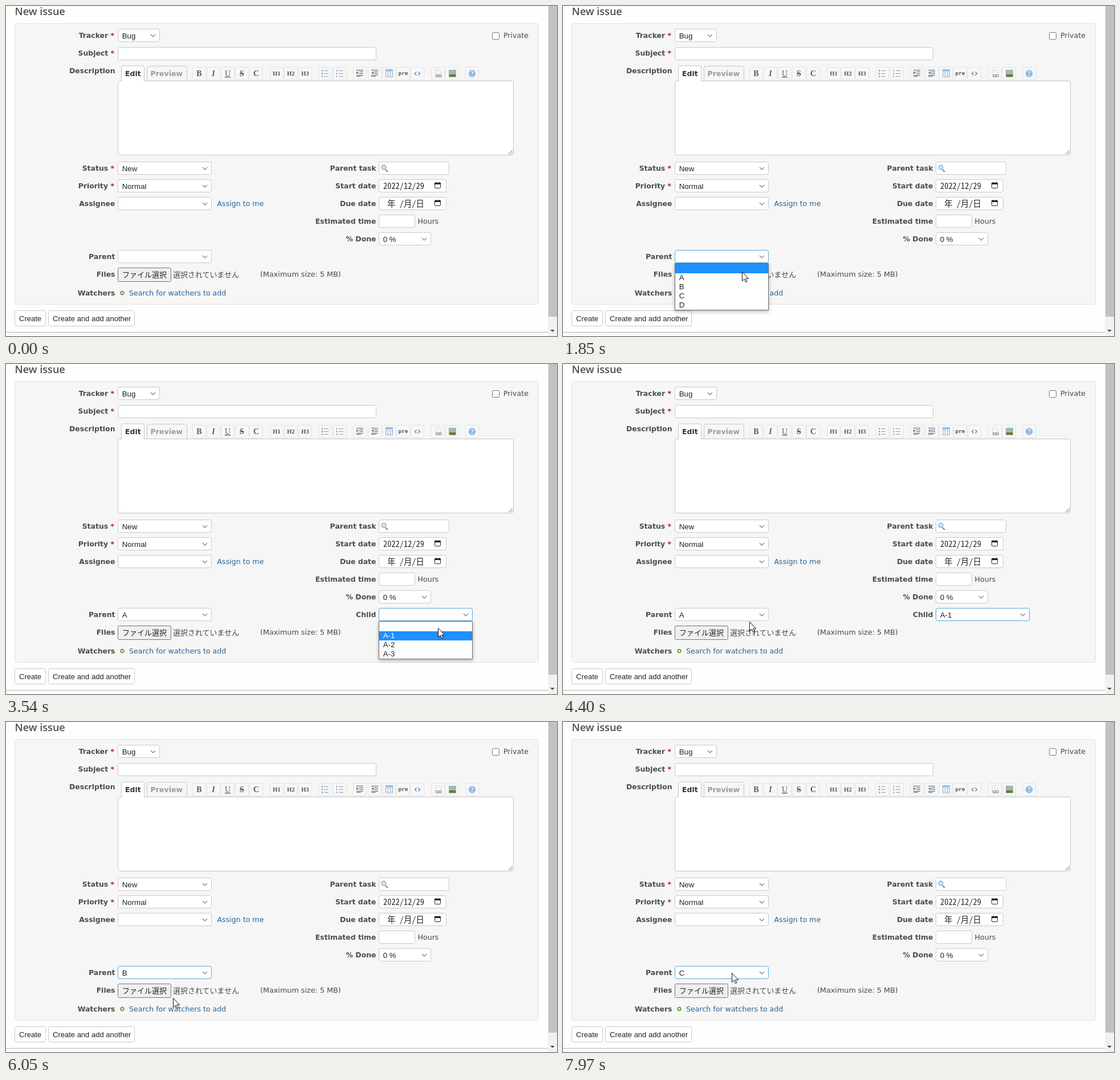
An HTML page for the animation above (8 s loop, 967x579 px).

```html
<!DOCTYPE html>
<html lang="en">
<head>
<meta charset="utf-8">
<title>New issue</title>
<style>
html, body { margin: 0; width: 100%; height: 100%; overflow: hidden; background: #fefefe; }
svg { display: block; width: 967px; height: 579px; }
text { white-space: pre; }
.b { font: bold 12.45px "DejaVu Sans", sans-serif; fill: #4c4c4c; }
.r { font: 12.6px "DejaVu Sans", sans-serif; fill: #484848; }
.link { fill: #2a6496; }
.ui { font: 13px "Liberation Sans", sans-serif; fill: #222; }
.value { font-size: 13.3px; }
.jp { font: 13px "Noto Sans CJK JP", "Noto Sans CJK", sans-serif; fill: #222; }
.date { font: 14.4px "Noto Sans Mono CJK JP", "Noto Sans CJK JP", monospace; fill: #222; }
.h { font: 600 18.1px "Open Sans", sans-serif; fill: #505050; }
.tool { font: bold 14px "Liberation Serif", serif; fill: #5c5c5c; }
.head { font: bold 10.5px "Liberation Serif", serif; fill: #505050; }
.pre { font: bold 9.5px "DejaVu Sans Mono", monospace; fill: #555; }
.end { text-anchor: end; }
.mid { text-anchor: middle; }
.menu > rect:first-child { filter: drop-shadow(0 2px 3px rgba(0, 0, 0, .3)); }
</style>
</head>
<body>
<svg id="stage" viewBox="0 0 967 579"></svg>
<script>
const stage = document.getElementById('stage');

function el(tag, attrs, parent = stage) {
  const node = document.createElementNS('http://www.w3.org/2000/svg', tag);
  for (const k in attrs) node.setAttribute(k, attrs[k]);
  parent.appendChild(node);
  return node;
}

function text(x, y, str, cls, parent, extra) {
  const node = el('text', { x, y, class: cls, ...extra }, parent);
  node.textContent = str;
  return node;
}

// Outlined box whose 1px border fills the pixels from (l, t) up to (r, b)
function box(l, t, r, b, stroke = '#c9c9c9', fill = '#fff', rx = 3, parent) {
  return el('rect', { x: l + .5, y: t + .5, width: r - l - 1, height: b - t - 1, rx, fill, stroke }, parent);
}

const fill = (x, y, width, height, color, parent) =>
  el('rect', { x, y, width, height, fill: color }, parent);

const line = (d, stroke, width = 1, parent) =>
  el('path', { d, stroke, fill: 'none', 'stroke-width': width }, parent);

function select(l, t, r, value = '', parent) {
  const frame = box(l, t, r, t + 23, undefined, undefined, 3, parent);
  line(`M${r - 16} ${t + 10}l4 4 4 -4`, '#8a8a8a', 1.4, parent);
  const label = text(l + 7.7, t + 16.5, value, 'ui value', parent);
  return { frame, label };
}

function label(right, y, str, required) {
  const node = text(right, y, str, 'b end');
  if (required) {
    const star = el('tspan', { fill: '#a3260f' }, node);
    star.textContent = ' *';
  }
  return node;
}

const rowTop = i => Math.ceil(452 + i * 16.2);

function menu(left, items) {
  const g = el('g', { class: 'menu' });
  box(left, 451, left + 165, rowTop(items.length) + 1, '#6e6e6e', '#fff', 0, g);
  const bar = fill(left + 1, 452, 163, 16, '#1e90ff', g);
  const rows = items.map((s, i) => text(left + 7.7, 464.5 + i * 16, s, 'ui value', g));
  return {
    show(open, active) {
      g.style.display = open ? '' : 'none';
      bar.setAttribute('y', rowTop(active));
      bar.setAttribute('height', rowTop(active + 1) - rowTop(active));
      rows.forEach((row, i) => row.style.fill = i === active ? '#fff' : '#222');
    }
  };
}

// Page and scrollbar
fill(0, 0, 967, 579, '#fefefe');
fill(951, 0, 16, 579, '#f1f1f1');
fill(952, 0, 15, 545, '#c1c1c1');
el('path', { d: 'M955 568h8l-4 4z', fill: '#505050' });
fill(0, 572, 951, 1, '#b4b4b4');
text(15.5, 15.5, 'New issue', 'h');
box(15, 30, 935, 524, '#e2e2e2', '#f6f6f6', 3);

// Labels
label(190, 56, 'Tracker', true);
label(190, 87, 'Subject', true);
label(191.5, 118, 'Description');
label(190, 288.5, 'Status', true);
label(190, 319.5, 'Priority', true);
[['Assignee', 350.5], ['Parent', 443.5], ['Files', 474.5], ['Watchers', 507.5]]
  .forEach(([s, y]) => label(191.5, y, s));
['Parent task', 'Start date', 'Due date', 'Estimated time', '% Done']
  .forEach((s, i) => label(649.5, 288.5 + i * 31, s));

// Top fields
select(196, 40, 270, 'Bug');
box(196, 72, 650, 95);
box(853, 46, 866, 59, '#767676', '#fff', 2);
text(873, 56, 'Private', 'r');

// Editor
box(247, 105, 318, 134, '#c9c9c9', '#f6f6f6');
box(196, 131, 891, 262, '#c4c4c4');
el('path', { d: 'M202.5 132V108q0-3 3-3h34q3 0 3 3V132', fill: '#fff', stroke: '#c4c4c4' });
text(209, 123, 'Edit', 'b', stage, { style: 'fill:#333' });
text(253.5, 123, 'Preview', 'b', stage, { style: 'fill:#9c9c9c;font-size:12.6px' });
line('M882 260l7-7M886 260l3-3', '#666');

// Toolbar
[339, 364, 389, 414, 439, 475, 500, 525, 560, 586, 621, 647, 672, 697, 722, 758, 783, 818]
  .forEach(x => box(x - 12, 107, x + 12, 130, '#e3e3e3', '#f7f7f7', 2));
const styles = ['', 'font-style:italic', 'text-decoration:underline;font-weight:400', 'text-decoration:line-through', ''];
[...'BIUSC'].forEach((c, i) => text(339 + i * 25, 123, c, 'tool mid', stage, { style: styles[i] }));
['H1', 'H2', 'H3'].forEach((s, i) => text(475 + i * 25, 122, s, 'head mid'));
text(697, 121, 'pre', 'pre mid');

for (let i = 0; i < 3; i++) {
  const y = 113.5 + i * 5;
  fill(554, y - 1, 2, 2, '#4a83bd');
  line(`M558 ${y}h8`, '#8f9daf');
  fill(580, y - 1.5, 1, 3, '#4a83bd');
  line(`M584 ${y}h8`, '#8f9daf');
}
[615, 641].forEach((x, i) => {
  line(`M${x} 112.5h12M${x + 5} 115.5h7M${x + 5} 118.5h7M${x} 121.5h12M${x} 123.5h8`, '#5a5a5a');
  el('path', { d: i ? `M${x + 4} 114.5v5l-4-2.5z` : `M${x} 114.5v5l4-2.5z`, fill: '#3c79c0' });
});
box(666, 111, 679, 125, '#8fb0d4', '#fff', 0);
fill(667, 112, 11, 3, '#9fc3e8');
line('M670.5 112v12M674.5 112v12M667 117.5h11M667 121.5h11', '#a9c4e0');
line('M720.5 115.5l-3 3 3 3M723.5 115.5l3 3-3 3', '#4a86c5', 1.4);

el('path', { d: 'M753.5 111.5h7l3 3v9h-10z', fill: '#f4f4f4', stroke: '#dcdcdc' });
box(754, 120, 760, 125, '#666', 'none', 2);
box(759, 120, 765, 125, '#666', 'none', 2);
box(777, 112, 790, 125, '#a5aeb5', '#8cbbe4', 0);
fill(778, 117, 11, 3, '#d2b548');
fill(778, 120, 11, 4, '#577f3c');
el('circle', { cx: 818, cy: 118.5, r: 6, fill: '#78a9dc', stroke: '#a8c6e4' });
el('circle', { cx: 818, cy: 118.5, r: 4.5, fill: 'none', stroke: '#d8e8f6', 'stroke-width': .8 });
text(818, 122, '?', 'mid', stage, { style: 'font:bold 9px "DejaVu Sans",sans-serif;fill:#fff' });

// Attributes
select(196, 273, 361, 'New');
select(196, 304, 361, 'Normal');
select(196, 335, 361);
text(370.5, 350.5, 'Assign to me', 'r link');

box(654, 273, 778, 296);
line('M666 287l4 4', '#b5803c', 2.2);
el('circle', { cx: 663, cy: 283, r: 3.8, fill: '#cfe6f8', stroke: '#7ea6cb', 'stroke-width': 1.3 });
[304, 335].forEach(y => {
  box(654, y, 773, y + 23);
  box(752, y + 6, 763, y + 16, '#222', '#fff', 1);
  fill(752, y + 6, 11, 3, '#222');
  fill(754, y + 5, 1.5, 2, '#222');
  fill(759.5, y + 5, 1.5, 2, '#222');
});
text(662, 320.5, '2022/12/29', 'date');
text(662, 351.5, ' 年 /月/日', 'date');
box(654, 366, 718, 389);
text(722.5, 381.5, 'Hours', 'r');
select(654, 397, 746, '0 %');

// Parent and child selects
const parent = select(196, 428, 361);
const childGroup = el('g', {});
const child = select(654, 428, 819, '', childGroup);
text(649.5, 443.5, 'Child', 'b end', childGroup);

// Files, watchers and buttons
box(196, 459, 290, 484, '#767676', '#efefef', 2);
text(204, 475.5, 'ファイル選択', 'jp');
text(293, 475.5, '選択されていません', 'jp', stage, { style: 'fill:#484848' });
text(446, 475, '(Maximum size: 5 MB)', 'r', stage, { style: 'font-size:12.75px' });
el('circle', { cx: 204, cy: 503.5, r: 2.7, fill: '#fff', stroke: '#69a04d', 'stroke-width': 2 });
text(216, 507.5, 'Search for watchers to add', 'r link');
box(15, 534, 70, 562);
box(74, 534, 226, 562);
text(23, 553, 'Create', 'ui');
text(82, 553, 'Create and add another', 'ui');

const parentMenu = menu(196, ['', 'A', 'B', 'C', 'D']);
const childMenu = menu(654, ['', 'A-1', 'A-2', 'A-3']);
const cursor = el('path', {
  d: 'M.5 .5V16.5L4.2 13.1 6.6 18.6 9 17.6 6.6 12.2H11.6Z',
  fill: '#fff', stroke: '#111', 'stroke-linejoin': 'round'
});

const LOOP = 8000;

// time, focus, open menu, active row, parent value, child value (null: hidden)
const states = [
  [0, '', '', 0, '', null],
  [990, 'p', 'p', 0, '', null],
  [1925, 'p', 'p', 1, '', null],
  [2320, 'p', '', 0, 'A', ''],
  [3000, 'c', 'c', 0, 'A', ''],
  [3480, 'c', 'c', 1, 'A', ''],
  [4010, 'c', '', 0, 'A', 'A-1'],
  [4810, 'p', 'p', 1, 'A', 'A-1'],
  [5500, 'p', 'p', 2, 'A', 'A-1'],
  [6050, 'p', '', 0, 'B', null],
  [6730, 'p', 'p', 2, 'B', null],
  [7250, 'p', 'p', 3, 'B', null],
  [7740, 'p', '', 0, 'C', null]
];

// first step, last step, step count, x, y reached
const start = [640, 561];
const moves = [
  [210, 840, 9, 347, 434],
  [1140, 1600, 7, 315, 465],
  [1850, 2080, 4, 310, 472],
  [2460, 2780, 5, 766, 439],
  [3250, 3710, 7, 752, 478],
  [4010, 4400, 6, 327, 452],
  [4480, 4730, 4, 296, 441],
  [4870, 5100, 4, 291, 470],
  [5190, 5270, 2, 291, 480],
  [5420, 5730, 5, 293, 484],
  [6350, 6650, 5, 298, 435],
  [6980, 7360, 6, 300, 499],
  [7820, 7970, 3, 296, 440]
];

const smooth = p => p * p * (3 - 2 * p);

function pointer(t) {
  let [x, y] = start;
  for (const [from, to, count, tx, ty] of moves) {
    if (t < from) break;
    const step = Math.min(count, 1 + Math.floor((t - from) * (count - 1) / (to - from)));
    const p = smooth(step / count);
    x += (tx - x) * p;
    y += (ty - y) * p;
  }
  return [Math.round(x), Math.round(y)];
}

function draw(t) {
  const [, focus, open, row, pValue, cValue] = states.findLast(s => s[0] <= t);
  parent.frame.setAttribute('stroke', focus === 'p' ? '#55aadd' : '#c9c9c9');
  child.frame.setAttribute('stroke', focus === 'c' ? '#55aadd' : '#c9c9c9');
  parent.label.textContent = pValue;
  child.label.textContent = cValue || '';
  childGroup.style.display = cValue === null ? 'none' : '';
  parentMenu.show(open === 'p', row);
  childMenu.show(open === 'c', row);
  cursor.style.display = t < moves[0][0] ? 'none' : '';
  cursor.setAttribute('transform', `translate(${pointer(t)})`);
}

const began = performance.now();
function tick() {
  draw((performance.now() - began) % LOOP);
  requestAnimationFrame(tick);
}
tick();
</script>
</body>
</html>
```
